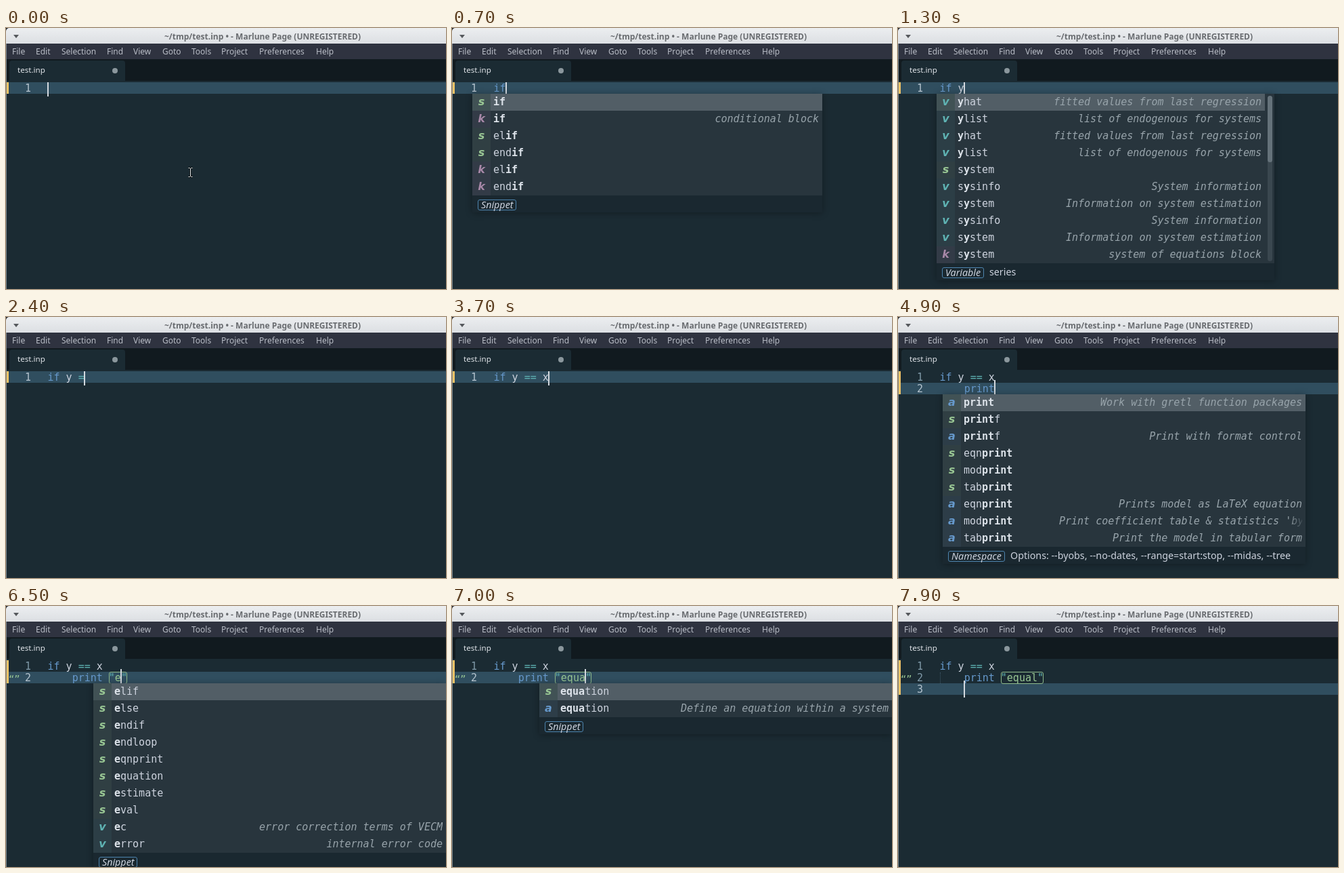
Write an HTML page that moves like this. It is 650 px wide and 385 px high and loops after 8000 ms.

```html
<!DOCTYPE html>
<html lang="en">
<head>
<meta charset="utf-8">
<title>Editor completions</title>
<style>
html, body { margin: 0; width: 100%; height: 100%; overflow: hidden; background: #1b2b33; }
#stage { position: relative; width: 650px; height: 385px; overflow: hidden; background: #1b2b33; }
#stage div, #menu span { position: absolute; white-space: pre; box-sizing: border-box; }
#title { left: 0; top: 0; width: 650px; height: 23px; background: #26282c; }
#title div { left: 0; top: 0; width: 650px; height: 23px; border-radius: 5px 0 0 0;
  background: linear-gradient(#eceef0, #dcdfe3); }
#title b { position: absolute; left: 379px; transform: translateX(-50%); color: #696c70;
  font: bold 12px/25px "Noto Sans", sans-serif; }
#title i { position: absolute; left: 11px; top: 10px; border: 4.5px solid transparent;
  border-top: 5px solid #55585c; border-bottom: 0; }
#menu { left: 0; top: 23px; width: 650px; height: 23px; background: #2f3340;
  font: 12px/23px "Noto Sans", sans-serif; color: #b9bdc6; }
#tabs { left: 0; top: 46px; width: 650px; height: 32px; background: #111a1f; }
#tab { left: 5px; top: 2px; width: 171px; height: 30px; border-radius: 4px 4px 0 0; background: #1b2b33;
  padding-left: 12px; font: 11.6px/28px "Noto Sans", sans-serif; color: #dfe3e8; }
#dot { left: 151.5px; top: 11px; width: 8px; height: 8px; border-radius: 50%; background: #8b979d; }
#edge { left: 0; top: 23px; width: 1px; height: 362px; background: #7b858a; }
#view { left: 0; top: 0; width: 650px; height: 385px; font: 15px/17px "DejaVu Sans Mono", monospace; color: #cdd3de; }
.now { left: 1px; width: 649px; height: 17px; background: #304e5f; }
.bar { left: 1px; top: 80px; width: 3px; background: #f5c567; }
.num, .code { margin-top: 1px; }
.num { left: 10px; width: 27px; text-align: right; color: #7f99a8; }
.code { left: 61.5px; }
.key { color: #6699cc; } .op { color: #5fb3b3; } .str { color: #99c794; }
.caret { width: 2px; background: #d3d9df; }
.box { left: 152px; top: 97px; height: 18px; border: 1px solid #8fbb8d; border-radius: 3px; }
.mark { left: 4px; top: 99px; color: #99c794; font: 16px/19px "DejaVu Sans", sans-serif; }
.guide { left: 62px; top: 98px; height: 16px; border-left: 1px dotted #3c5665; }
.pop { background: #28353d; box-shadow: 0 1px 10px #0005; }
.row { left: 0; width: 100%; height: 25px; line-height: 25px; }
.row b { color: #dde3ea; }
.row.on { background: #525e66; }
.icon { left: 0; width: 27px; height: 25px; text-align: center; font: italic bold 16px/24px "DejaVu Sans", sans-serif; }
.v { color: #5fb3b3; background: #5fb3b312; } .s { color: #99c794; background: #99c79412; }
.a { color: #6699cc; background: #6699cc14; } .k { color: #a888a8; background: #c594c512; }
.on .icon { background-color: #28403d66; }
.label { left: 31px; }
.info { max-width: 359px; overflow: hidden; font-style: italic; color: #98a4ab; }
.cut { -webkit-mask: linear-gradient(90deg, #000 94%, #0003); mask: linear-gradient(90deg, #000 94%, #0003); }
.gutter { right: 0; top: 0; width: 14px; background: #28353d; }
.track, .thumb { right: 3px; top: 3px; width: 7px; border-radius: 4px; }
.track { bottom: 3px; background: #3a474f; }
.thumb { height: 98px; background: #65727a; }
.foot { left: 0; width: 100%; height: 25px; background: #1a2830; font: 14.25px/14px "Noto Sans", sans-serif; }
.foot i { position: absolute; left: 8px; top: 6px; height: 16px; box-sizing: border-box; padding: 0 4px;
  border: 1px solid #4d84ae; border-radius: 3px; line-height: 13px; }
.foot span { position: absolute; top: 6px; }
</style>
</head>
<body>
<div id="stage">
  <div id="title"><div></div><i></i><b>~/tmp/test.inp • - Marlune Page (UNREGISTERED)</b></div>
  <div id="menu"></div>
  <div id="tabs"><div id="tab">test.inp<div id="dot"></div></div></div>
  <div id="view"></div>
  <div id="edge"></div>
</div>
<script>
const LOOP = 8000, CHAR = 9.03, TOP = 80, LINE = 17, ROW = 25;
const view = document.getElementById("view");

const menu = { File: 9, Edit: 44, Selection: 82, Find: 149, View: 188, Goto: 231, Tools: 274,
  Project: 318, Preferences: 374, Help: 458 };
document.getElementById("menu").innerHTML = Object.entries(menu)
  .map(([name, x]) => `<span style="left:${x}px">${name}</span>`).join("");

// Each row: kind, label, optional description
const yRows = ["v yhat|fitted values from last regression", "v ylist|list of endogenous for systems"];
const sysRows = ["v sysinfo|System information", "v system|Information on system estimation"];
const prints = ["a print|Work with gretl function packages", "s printf", "a printf|Print with format control",
  "s eqnprint", "s modprint", "s tabprint", "a eqnprint|Prints model as LaTeX equation",
  "a modprint|Print coefficient table & statistics 'by hand'", "a tabprint|Print the model in tabular form"];
const options = "Options: --byobs, --no-dates, --range=start:stop, --midas, --tree";
const equation = ["s equation", "a equation|Define an equation within a system"];

// Completion lists by typed prefix
const lists = {
  i: { right: 547, scroll: 1, tag: "Snippet", rows: ["s if", "s include", "k if|conditional block",
    "a include|Include function definitions", "a info|Information on data set", "a intreg|Interval regression model",
    "v irf|impulse response functions", "a imhof|Imhof probabilities", "a inv|Matrix inverse",
    "a isconst|Test for constant series"] },
  if: { right: 547, tag: "Snippet", rows: ["s if", "k if|conditional block", "s elif", "s endif", "k elif", "k endif"] },
  y: { right: 556, scroll: 1, tag: "Variable", note: "series", rows: [...yRows, ...yRows, "s system", ...sysRows, ...sysRows,
    "k system|system of equations block"] },
  x: { right: 619, scroll: 1, tag: "Variable", note: "list", rows: ["v xlist|list of regressors from last model",
    "v xlist|list of exogenous for systems", "a xtab|Cross-tabulate variables", "s xtab", "v nextobs", "s index",
    "a xcorrgm|Cross-correlogram", "a textplot|ASCII plot", "a exec", "k next"] },
  p: { right: 602, scroll: 1, tag: "Namespace", note: options, rows: [...prints, "a plot|Build a plot block"] },
  pr: { right: 602, scroll: 1, tag: "Namespace", note: options, rows: [...prints, "a princomp|Principal components"] },
  print: { right: 602, tag: "Namespace", note: options, rows: prints },
  e: { right: 650, tag: "Snippet", rows: ["s elif", "s else", "s endif", "s endloop", "s eqnprint", "s equation",
    "s estimate", "s eval", "v ec|error correction terms of VECM", "v error|internal error code"] },
  eq: { right: 650, tag: "Snippet", rows: ["s eqnprint", ...equation, "a eqnprint|Prints model as LaTeX equation"] },
  equ: { right: 650, tag: "Snippet", rows: equation }
};
lists.pri = lists.pr;
lists.prin = lists.print;
lists.equa = lists.equ;

// Steps: start time, text, completion prefix, caret offset from the end
const first = "if y == x", second = first + "\n    ", quoted = second + 'print "';
const steps = [
  [0, ""], [600, "i", "i"], [700, "if", "if"], [800, "if "],
  [1200, "if y"], [1300, "if y", "y"], [1700, "if y "], [1800, "if y ="], [1900, "if y = "],
  [2400, "if y ="], [2700, "if y =="], [2900, "if y == "], [3100, first, "x"], [3700, first], [3900, second],
  ...[4400, 4500, 4600, 4800, 4900].map((t, i) => {
    const word = "print".slice(0, i + 1);
    return [t, second + word, word];
  }),
  [5400, second + "print "], [5900, quoted + '"', "", 1], [6100, quoted + '"', "", 1],
  ...[6500, 6700, 6800, 7000, 7100].map((t, i) => {
    const word = "equal".slice(0, i + 1);
    return [t, quoted + word + '"', lists[word] ? word : "", 1];
  }),
  [7700, quoted + 'equal"'], [7900, quoted + 'equal"\n    ']
];

const at = col => Math.floor(61 + CHAR * col);
const div = (cls, css, body = "") => `<div class="${cls}" style="${css}">${body}</div>`;
const span = (cls, body) => `<span class="${cls}">${body}</span>`;

const paint = text => text.replace(/"(\w*)"|\b(?:if|print)\b|=+/g, (m, word) =>
  m[0] === '"' ? span("op", '"') + span("str", word) + span("op", '"') : span(m[0] === "=" ? "op" : "key", m));

function popup(key, col, top) {
  const { right, scroll, tag, note = "", rows } = lists[key];
  const left = at(col) - 31, height = rows.length * ROW;
  const body = rows.map((row, i) => {
    const [head, info] = row.split("|"), kind = head[0], label = head.slice(2);
    const cut = info && info.length > 40 ? " cut" : "";
    return div("row" + (i ? "" : " on"), `top:${i * ROW}px`,
      div("icon " + kind, "", kind) +
      div("label", "", label.replace(key, `<b>${key}</b>`)) +
      (info ? div("info" + cut, `right:${scroll ? 19 : 5}px`, info.replace("&", "&amp;")) : ""));
  }).join("");
  const bar = scroll ? div("gutter", `height:${height}px`, div("track", "") + div("thumb", "")) : "";
  return div("pop", `left:${left}px;top:${top}px;width:${right - left}px;height:${height + ROW}px`,
    body + bar + div("foot", `top:${height}px`, `<i>${tag}</i><span>${note}</span>`));
}

// Place the note just after its tag
function alignNote() {
  const tag = view.querySelector(".foot i");
  if (tag) tag.nextSibling.style.left = tag.offsetLeft + tag.offsetWidth + 8 + "px";
}

const beam = `<svg style="position:absolute;left:267px;top:205px" width="12" height="17" fill="none">
  <path d="M2.5 1.5h2l1 1 1-1h2M5.5 2v12M2.5 14.5h2l1-1 1 1h2" stroke="#0b1114" stroke-width="3"/>
  <path d="M2.5 1.5h2l1 1 1-1h2M5.5 2v12M2.5 14.5h2l1-1 1 1h2" stroke="#e8ecee"/></svg>`;

function draw([time, text, key, back = 0]) {
  const lines = text.split("\n"), last = lines.length - 1;
  const top = TOP + last * LINE, col = lines[last].length - back;
  let html = div("now", `top:${top}px`) + div("bar", `height:${lines.length * LINE}px`);
  lines.forEach((line, i) => {
    const y = `top:${TOP + i * LINE}px`;
    html += div("num", y + (i === last ? ";color:#b4c3ce" : ""), i + 1) + div("code", y, paint(line));
  });
  if (time >= 6100) {
    const length = lines[1].length - 10;
    html += div("box", `width:${Math.round(length * CHAR)}px`) + div("mark", "", "“”");
  }
  if (last === 2) html += div("guide", "");
  const start = Math.max(TOP, top - 4);
  html += div("caret", `left:${at(col)}px;top:${start}px;height:${top + 21 - start}px`);
  if (key) html += popup(key, col - key.length, top + LINE);
  if (!time) html += beam;
  view.innerHTML = html;
  alignNote();
}

let shown;
const begin = performance.now();
function tick() {
  const time = (performance.now() - begin) % LOOP;
  const step = steps.findLast(s => s[0] <= time);
  if (step !== shown) draw(shown = step);
  requestAnimationFrame(tick);
}
tick();
</script>
</body>
</html>
```
